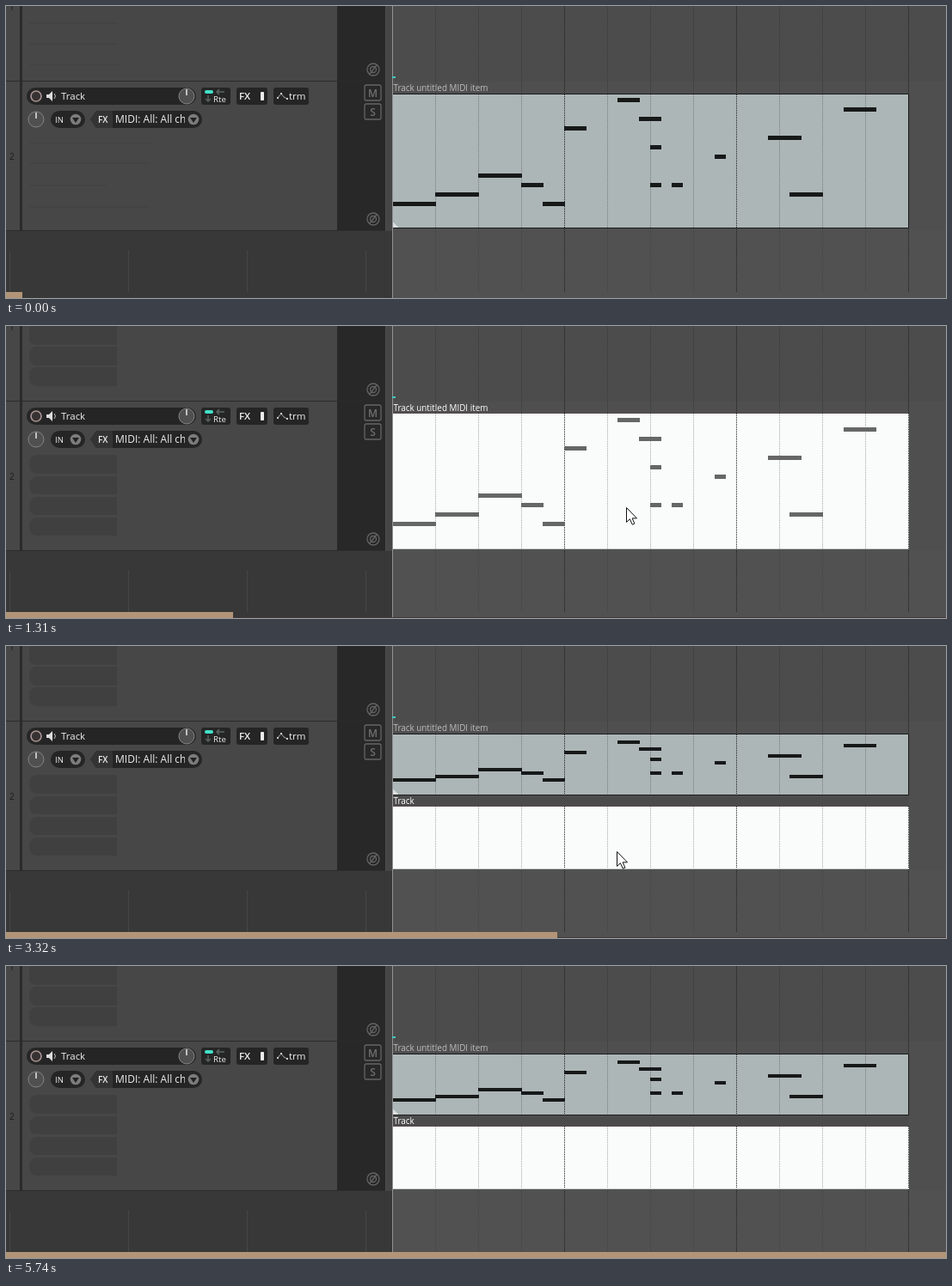
Animation, 1093 px wide and 340 px high, one loop 8.74 s. Source, as an HTML page:

```html
<!DOCTYPE html>
<html lang="en">
<head>
<meta charset="utf-8">
<title>MIDI item lanes</title>
<style>
  html, body { margin: 0; width: 100%; height: 100%; overflow: hidden; background: #4d4d4d; }
  svg { display: block; width: 1093px; height: 340px; }
  text { font-family: "Open Sans", "Noto Sans", sans-serif; fill: #eee; white-space: pre; }
  .crisp { shape-rendering: crispEdges; }
  .button { fill: #252525; }
  .outline { fill: none; stroke: #646464; stroke-width: 1.3; }
</style>
</head>
<body>
<svg viewBox="0 0 1093 340">
  <defs>
    <g id="phase" class="outline"><circle r="7"/><circle r="3.5"/><path d="M-4 5L4-5"/></g>
    <g id="drop"><circle r="6.3" fill="#7c7c7c"/><path d="M-4-2H4L0 4Z" fill="#222"/></g>
    <g id="knob"><circle r="9" fill="#505050" stroke="#858585"/><path d="M0-1V-8" stroke="#ddd" stroke-width="1.6"/></g>
    <clipPath id="inputClip"><path d="M124 122h84v20h-84z"/></clipPath>
    <clipPath id="itemClip"><path d="M450 88h600v172h-600z"/></clipPath>
  </defs>

  <g class="crisp">
    <path fill="#4c4c4c" d="M449 0h644v88H449z"/>
    <path fill="#4f4f4f" d="M449 88h644v172H449z"/>
    <path fill="#515151" d="M449 260h644v80H449z"/>
    <path fill="#474747" d="M0 0h386v262H0z"/>
    <path fill="#282828" d="M385 0h56v262h-56z"/>
    <path fill="#464646" d="M442 0h7v262h-7z"/>
    <path fill="#383838" d="M0 262h449v78H0z"/>
    <path fill="#2b2b2b" d="M16 0h3v262h-3zM0 87h441v1H0zM0 261h441v1H0z"/>
    <path fill="#464646" d="M4 285h1v48h-1zM142 285h1v48h-1zM280 285h1v48h-1zM418 285h1v48h-1z"/>
  </g>
  <g id="streaks" stroke="#414141"><path d="M27 20h103M27 44h103M27 68h103M27 160h140M27 183h140M27 209h90M27 234h140"/></g>
  <g id="pills" fill="#404040">
    <path d="M27 0h102v22H35q-8 0-8-8zM35 24h94v22H35q-8 0-8-11t8-11zM35 48h94v22H35q-8 0-8-11t8-11z"/>
    <path d="M36 150h93v22H36q-9 0-9-11t9-11zM36 175h93v21H36q-9 0-9-10t9-11zM36 199h93v21H36q-9 0-9-10t9-11zM36 223h93v21H36q-9 0-9-10t9-11z"/>
  </g>

  <g font-size="10"><text x="4" y="5" style="fill:#1c1c1c">1</text><text x="4" y="179" style="fill:#1c1c1c">2</text></g>

  <rect class="button" x="24" y="95" width="197" height="20" rx="10"/>
  <circle cx="35" cy="105" r="6" fill="#383232" stroke="#a79191" stroke-width="1.7"/>
  <path d="M47 103h3l4-4v12l-4-4h-3z" fill="#ddd"/>
  <path d="M56 102q3 3 0 6" fill="none" stroke="#bbb"/>
  <text x="64" y="109" font-size="11.5">Track</text>
  <use href="#knob" x="210" y="105"/>
  <rect class="button" x="227" y="95" width="34" height="20" rx="3"/>
  <rect x="231" y="98" width="10" height="4" rx="2" fill="#43dfc9"/>
  <path d="M245 100h9M248 97l-3 3 3 3M235 104v7M232 108l3 3 3-3" fill="none" stroke="#596360" stroke-width="1.5"/>
  <text x="241" y="112" font-size="9.7">Rte</text>
  <rect class="button" x="268" y="95" width="36" height="20" rx="3"/>
  <text x="271" y="109" font-size="11.5" font-weight="600">FX</text>
  <rect x="296" y="100" width="4" height="10" rx="1" fill="#eee"/>
  <rect class="button" x="311" y="95" width="41" height="20" rx="3"/>
  <path d="M316 107l4-5 3 4 4 2" fill="none" stroke="#aaa"/>
  <path d="M315 106h2v2h-2zM319 101h2v2h-2zM326 107h2v2h-2z" fill="#ccc"/>
  <text x="329" y="109" font-size="11.5">trm</text>

  <use href="#knob" x="35" y="132"/>
  <rect class="button" x="52" y="122" width="40" height="20" rx="10"/>
  <text x="57" y="136" font-size="9.5">IN</text>
  <use href="#drop" x="81" y="132"/>
  <path class="button" d="M98 132l7-10h113a10 10 0 0 1 0 20H105z"/>
  <path fill="#343434" d="M98 132l7-10h19v20h-19z"/>
  <text x="107" y="136" font-size="10" font-weight="600">FX</text>
  <text x="127" y="136" font-size="12" clip-path="url(#inputClip)">MIDI: All: All ch</text>
  <use href="#drop" x="218" y="132"/>

  <use href="#phase" x="427" y="74"/>
  <use href="#phase" x="427" y="248"/>
  <rect class="outline" x="417" y="92" width="19" height="18" rx="2"/>
  <rect class="outline" x="417" y="114" width="19" height="18" rx="2"/>
  <g font-size="12" font-weight="600" text-anchor="middle"><text x="426.5" y="105.5" style="fill:#707070">M</text><text x="426.5" y="127.5" style="fill:#707070">S</text></g>

  <g id="grid" class="crisp"></g>
  <g id="items" class="crisp"></g>
  <g class="crisp"><path id="editLine" d="M449 0h1v340h-1z"/><path d="M449 82h4v2h-4z" fill="#40c8b8"/></g>
  <g id="marker" class="crisp"><path d="M700.5 179.5h7v10h-7z" fill="#a0a8a8" stroke="#d5dada"/><path d="M704 187h1v1h-1z" fill="#111"/></g>
  <path id="cursor" d="M-.5-.5V16.5l3.9-3.7 2.9 6.4 2.6-1.1-2.8-6.2h5.4z" fill="#fff" stroke="#111"/>
  <path id="edge" class="crisp" d="M0 339h1093v1H0z" fill="#433638"/>
  <rect id="bar" class="crisp" y="333" height="7" fill="#b29477"/>
</svg>
<script>
const $ = id => document.getElementById(id);
const LOOP = 8740, FRAMES = 58;
// start cell, length in cells, pitch row
const notes = [[0,4,11],[4,4,10],[8,4,8],[12,2,9],[14,2,11],[16,2,3],[21,2,0],[23,2,2],
  [24,1,5],[24,1,9],[26,1,9],[30,1,6],[35,3,4],[37,3,10],[42,3,1]];
const beats = Array.from({ length: 12 }, (_, i) => 499 + 50 * i);
const isBar = x => (x - 449) % 200 === 0;

const rect = (x, y, w, h, fill) => `<rect x="${x}" y="${y}" width="${w}" height="${h}" fill="${fill}"/>`;
const gridLines = (y1, y2, minor, major) => beats.map(x =>
  `<path d="M${x + .5} ${y1}V${y2}" stroke="${isBar(x) ? major : minor}" stroke-dasharray="1 1"/>`).join('');

function noteRect([cell, length, row], rowY, rowStep, height, ink) {
  const x = Math.floor(449 + 12.5 * cell);
  const end = Math.floor(450 + 12.5 * (cell + length));
  return rect(x, rowY + row * rowStep, end - x, height, ink);
}

// top and bottom bound the fill; a one pixel border lies outside them
function item(top, bottom, title, titleY, selected, rowY, rowStep, noteHeight) {
  const bg = selected ? '#f9fcfb' : '#adb6b6';
  const ink = selected ? '#666' : '#171919';
  let out = rect(450, top - 1, 600, 1, selected ? '#554a52' : '#1b1b1b')
    + rect(450, bottom, 600, 1, selected ? '#c9cccc' : '#1b1b1b')
    + rect(450, top, 600, bottom - top, bg)
    + gridLines(top, bottom, selected ? '#a5a8a8' : '#737a7a', '#1d1d1d');
  if (!selected) out += rect(1049, top, 1, bottom - top, '#1b1b1b')
    + `<path d="M450 ${bottom - 6}l6 6h-6z" fill="#dce0e0"/>`;
  if (rowStep) out += notes.map(note => noteRect(note, rowY, rowStep, noteHeight, ink)).join('');
  return `<g clip-path="url(#itemClip)">${out}</g>`
    + `<text x="450.5" y="${titleY}" font-size="9.9" style="fill:${selected ? '#fff' : '#bdbdbd'}">${title}</text>`;
}

const NAME = 'Track untitled MIDI item';
const views = {
  idle: item(103, 258, NAME, 99, false, 107, 11, 5),
  selected: item(102, 259, NAME, 99, true, 107, 11, 5),
  lanes: item(103, 173, NAME, 99, false, 110, 4, 4)
    + rect(450, 175, 600, 12, '#4b4b4b') + item(187, 259, 'Track', 184, true)
};
$('grid').innerHTML = gridLines(0, 102, '#393939', '#1d1d1d') + gridLines(260, 333, '#444', '#1d1d1d');

// frame, x, y
const path = [[4,723,322],[7,720,230],[9,712,202],[11,703,188],[13,722,212],[16,722,212],
  [20,716,197],[23,713,190],[27,713,190],[31,711,236],[33,711,240],[36,711,240],[39,700,318]];

// Frames last 100 ms, a few of them 110 ms.
const startOf = i => 100 * i + 10 * [12, 22, 34, 57].filter(n => n <= i).length;
function frameAt(time) {
  let i = FRAMES - 1;
  while (i > 0 && startOf(i) > time) i--;
  return i;
}

function cursorAt(i) {
  const k = path.findIndex(p => p[0] >= i);
  if (k < 0 || i < path[0][0]) return null;
  const b = path[k], a = path[Math.max(0, k - 1)];
  const f = b === a ? 0 : (i - a[0]) / (b[0] - a[0]);
  return [1, 2].map(n => Math.round(a[n] + (b[n] - a[n]) * f));
}

const show = (id, on) => $(id).setAttribute('visibility', on ? 'visible' : 'hidden');
let shownFrame = -1, shownView = '';

function draw(i) {
  const view = i < 13 ? 'idle' : i < 26 ? 'selected' : 'lanes';
  if (view !== shownView) $('items').innerHTML = views[shownView = view];
  $('bar').setAttribute('width', Math.round(1093 * (i + 1) / FRAMES));
  // the edit line blinks
  const lit = i % 14 > 5 && i % 14 < 12;
  $('editLine').setAttribute('fill', lit ? '#40c8a8' : '#929292');
  show('edge', i > 0);
  show('pills', i > 0);
  show('streaks', i === 0);
  show('marker', i === 12);
  const at = i === 12 ? null : cursorAt(i);
  show('cursor', at);
  if (at) $('cursor').setAttribute('transform', `translate(${at})`);
}

function tick() {
  const i = frameAt(performance.now() % LOOP);
  if (i !== shownFrame) draw(shownFrame = i);
  requestAnimationFrame(tick);
}
tick();
</script>
</body>
</html>
```
